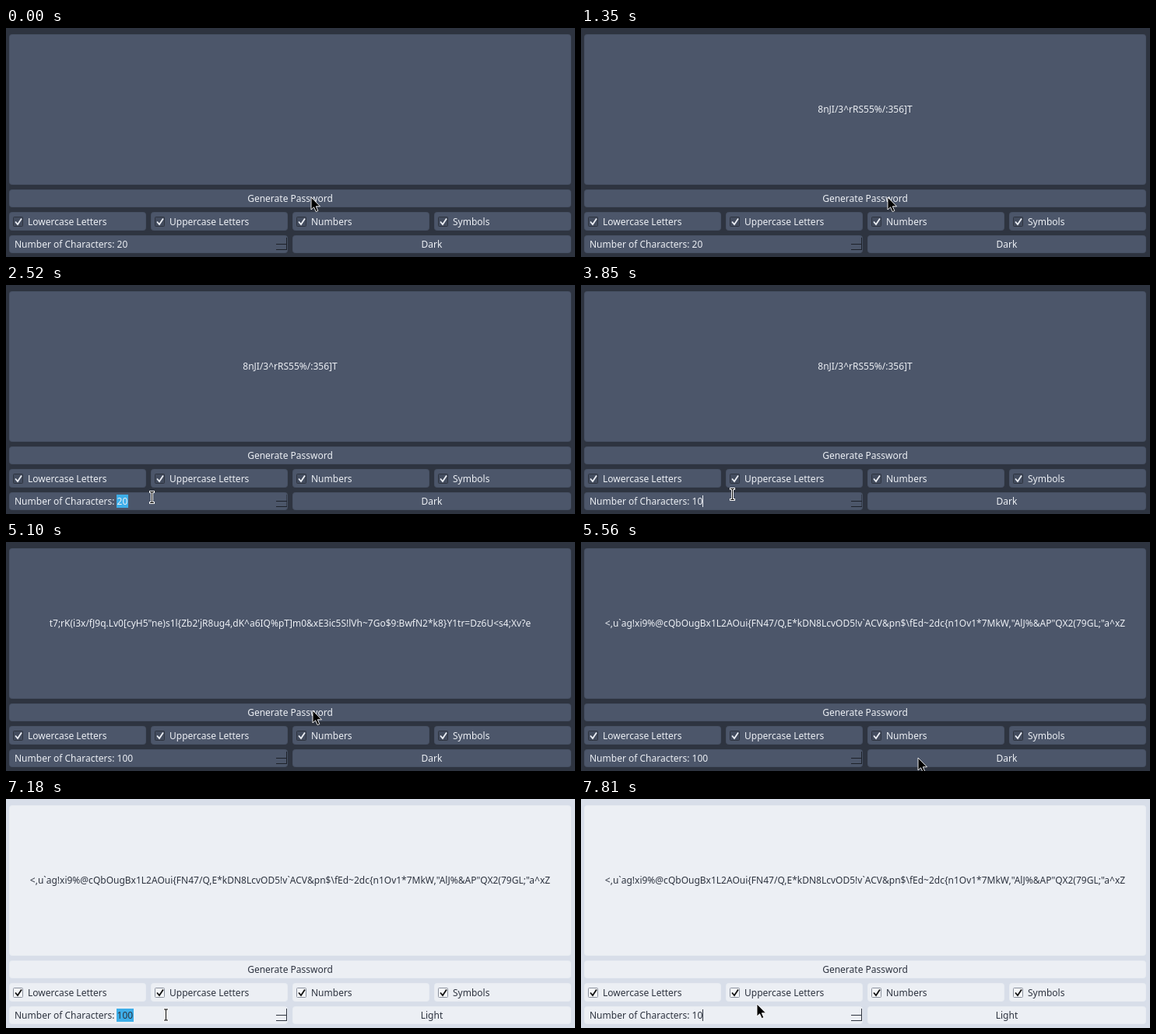
These frames come from a looping animation (731x295 px, 8 s). An HTML page:

```html
<!DOCTYPE html>
<html lang="en">
<head>
<meta charset="utf-8">
<title>Password generator</title>
<style>
  html, body { margin: 0; width: 100%; height: 100%; overflow: hidden; }
  svg {
    --bg: #2e3440; --panel: #4c566a; --edge: #475164; --ink: #eceff4;
    --box: #434c5e; --boxEdge: #2e3440; --line: #1d2129;
    display: block; background: var(--bg);
    font: 12px "Noto Sans", sans-serif;
  }
  svg.light {
    --bg: #d8dee9; --panel: #eceff4; --edge: #e8ecf2; --ink: #2e3440;
    --box: #f4f6f9; --boxEdge: #8a909c; --line: #2e3440;
  }
  text { fill: var(--ink); white-space: pre; }
  .mid { text-anchor: middle; }
  .panel { fill: var(--panel); stroke: var(--edge); }
  .check { fill: var(--box); stroke: var(--boxEdge); }
  .tick { fill: none; stroke: var(--ink); stroke-width: 1.8; }
  .light .tick { stroke: #111; }
  .spin { fill: none; stroke: var(--line); }
  .caret { fill: var(--ink); }
  .select { fill: #3daee9; }
</style>
</head>
<body>
<svg id="app" width="731" height="295" viewBox="0 0 731 295">
  <g id="panels"></g>
  <text id="password" class="mid" x="365" y="109"></text>
  <text class="mid" x="365" y="224">Generate Password</text>
  <g id="checks"></g>
  <rect id="select" class="select" x="142" y="270" height="17"/>
  <text id="count" x="11" y="283"></text>
  <rect id="caret" class="caret" x="156" y="271" width="1" height="15"/>
  <path class="spin" d="M347 278.5H361M347 285.5H361"/>
  <path id="spinSide" class="spin" d="M360.5 270V286"/>
  <text id="theme" class="mid" x="547" y="283"></text>
  <path id="arrow" d="M0 0V16L3.6 12.8L6.2 18.6L8.8 17.5L6.3 11.8H11.5Z" fill="#000" stroke="#fff" stroke-width=".9"/>
  <g id="beam" fill="none">
    <path d="M-3.5 -7H3.5M0 -7V7M-3.5 7H3.5" stroke="#fff" stroke-width="3"/>
    <path d="M-2.5 -7H2.5M0 -7V7M-2.5 7H2.5" stroke="#000"/>
  </g>
</svg>
<script>
const $ = id => document.getElementById(id);
const LOOP = 8000;

const panel = (x, y, w, h) =>
  `<rect class="panel" x="${x + .5}" y="${y + .5}" width="${w - 1}" height="${h - 1}" rx="3"/>`;
const check = (x, label) =>
  `<rect class="check" x="${x + 5.5}" y="243.5" width="12" height="12" rx="1"/>
   <path class="tick" d="M${x + 8} 249.5l3 3.5l5 -7.5"/>
   <text x="${x + 24}" y="254">${label}</text>`;

const labels = ["Lowercase Letters", "Uppercase Letters", "Numbers", "Symbols"];
const column = i => 4 + 182 * i;
$("panels").innerHTML =
  panel(4, 8, 722, 194) + panel(4, 208, 722, 23) +
  labels.map((_, i) => panel(column(i), 237, 176, 24)).join("") +
  panel(4, 267, 358, 23) + panel(368, 267, 358, 23);
$("checks").innerHTML = labels.map((s, i) => check(column(i), s)).join("");

const passwords = [
  "",
  "8nJI/3^rRS55%/:356]T",
  "t7;rK(i3x/fJ9q.Lv0[cyH5\"ne)s1l{Zb2'jR8ug4,dK^a6IQ%pT]m0&xE3ic5S!lVh~7Go$9:BwfN2*k8}Y1tr=Dz6U<s4;Xv?e",
  "<,u`ag!xi9%@cQbOugBx1L2AOui{FN47/Q,E*kDN8LcvOD5!v`ACV&pn$\\fEd~2dc{n1Ov1*7MkW,\"AlJ%&AP\"QX2(79GL;\"a^xZ"
];

// time, pointer, x, y, then any values that change
const steps = [
  [0, "arrow", 392, 218, { pw: 0, count: 20, edit: "", light: false }],
  [1350, "arrow", 394, 218, { pw: 1 }],
  [1390, "arrow", 394, 219],
  [1430, "arrow", 393, 220],
  [1850, "beam", 186.5, 274.5],
  [2390, "beam", 186.5, 274, { edit: "select" }],
  [2430, "beam", 187.5, 274],
  [2520, "beam", 187.5, 273.5],
  [3270, "beam", 194.5, 271.5, { count: 10, edit: "caret" }],
  [3850, "beam", 194.5, 269.5],
  [4430, "arrow", 392, 216, { count: 100, edit: "", pw: 2 }],
  [5100, "arrow", 394, 217],
  [5140, "arrow", 395, 217],
  [5430, "arrow", 400, 220, { pw: 3 }],
  [5470, "arrow", 411, 240],
  [5510, "arrow", 424, 263],
  [5560, "arrow", 433, 278],
  [6180, "arrow", 215, 285, { light: true }],
  [6230, "arrow", 209, 285],
  [6270, "beam", 206.5, 284],
  [6310, "beam", 205.5, 283.5],
  [7180, "beam", 205.5, 278, { edit: "select" }],
  [7220, "beam", 206.5, 277],
  [7270, "beam", 207.5, 276],
  [7810, "arrow", 226, 264, { count: 10, edit: "caret" }]
];

function stateAt(t) {
  const s = {};
  for (const [at, pointer, x, y, change] of steps) {
    if (at > t) break;
    Object.assign(s, { pointer, x, y }, change);
  }
  return s;
}

const show = (id, on) => $(id).setAttribute("visibility", on ? "visible" : "hidden");

function draw(t) {
  const s = stateAt(t);
  $("app").setAttribute("class", s.light ? "light" : "dark");
  $("theme").textContent = s.light ? "Light" : "Dark";
  $("password").textContent = passwords[s.pw];
  $("count").textContent = "Number of Characters: " + s.count;
  $("select").setAttribute("width", s.count > 99 ? 22 : 15);
  show("select", s.edit === "select");
  show("caret", s.edit === "caret");
  $("spinSide").setAttribute("opacity", s.edit && !s.light ? .5 : 1);
  for (const id of ["arrow", "beam"]) show(id, id === s.pointer);
  $(s.pointer).setAttribute("transform", `translate(${s.x} ${s.y})`);
}

const start = performance.now();
function tick() {
  draw((performance.now() - start) % LOOP);
  requestAnimationFrame(tick);
}
tick();
</script>
</body>
</html>
```
